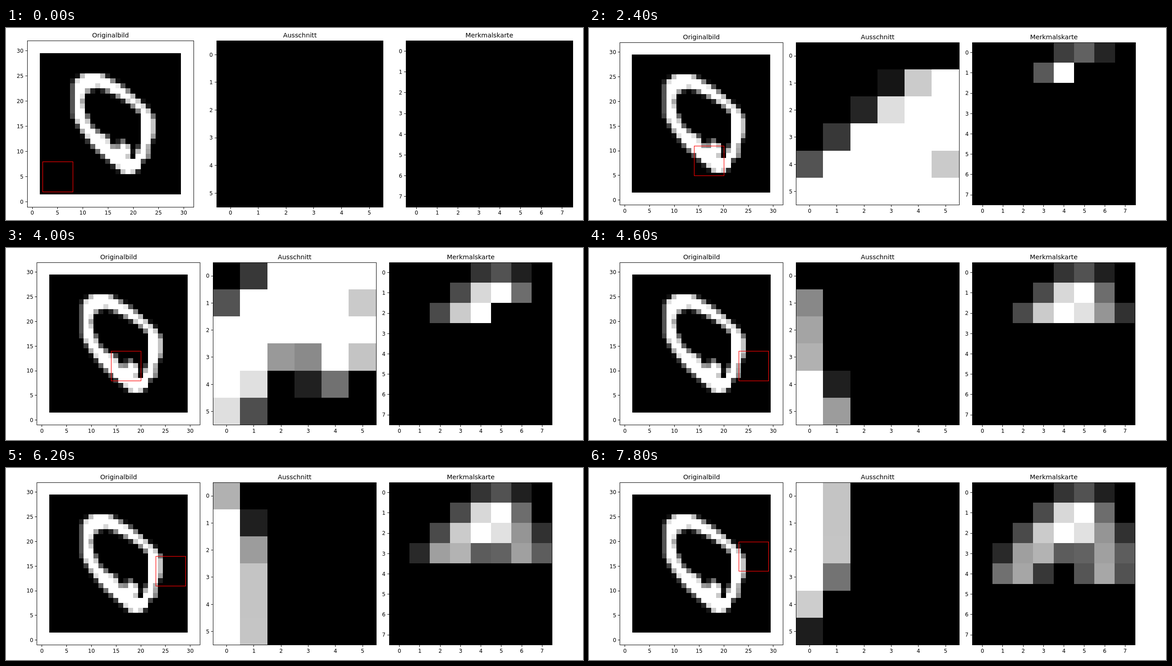
Animation, 1280 px wide and 427 px high, one loop 8 s. Source, as an HTML page with a canvas:

```html
<!DOCTYPE html>
<html lang="de">
<head>
<meta charset="utf-8">
<style>
  html, body { margin: 0; width: 100%; height: 100%; overflow: hidden; background: #fff; }
  canvas { display: block; }
</style>
</head>
<body>
<canvas id="stage" width="1280" height="427"></canvas>
<script>
const ctx = document.getElementById('stage').getContext('2d');
const STEP = 200, GRID = 8, STEPS = 5 * GRID, WINDOW = 6, STRIDE = 3, SIZE = 32;
const FONT = '"DejaVu Sans", sans-serif';

// The handwritten zero as an outer contour and a hole, in pixel units with y pointing up.
const OUTER = `M18.7 6 L13 11 L10.3 14.5 L8.67 17.6 V24.2 L10.8 26 H14 L18.3 23.5 L20.2 22
  L21.9 20.4 L23.5 19 L24.77 17 V13.8 L23.7 11.8 L23.6 9.3 L22 8.4 V7.3 L20.3 6 Z`;
const HOLE = `M13.3 23.2 L11.2 22.2 L10.6 20.7 L11 18.5 L12.1 15.7 L13.4 14.5 L15.7 13.2
  L16 12 L16.5 11.4 L17.6 11.3 L17.8 12.4 H18.6 L19.9 11.6 L20.2 10.5 L19.7 9.8 L19.9 9.1
  H20.9 L21.4 10.9 L22 11.8 V18 L20.5 19.5 L18.3 21.1 L15.5 22.4 Z`;

const makeGrid = (n, value) =>
  Array.from({ length: n }, (_, y) => Array.from({ length: n }, (_, x) => value(x, y)));

// Antialiasing on a tiny canvas turns the contours into grey pixels.
function rasterize(path) {
  const small = document.createElement('canvas');
  small.width = small.height = SIZE;
  const pen = small.getContext('2d', { willReadFrequently: true });
  pen.fill(new Path2D(path), 'evenodd');
  const { data } = pen.getImageData(0, 0, SIZE, SIZE);
  return makeGrid(SIZE, (x, y) => data[4 * (y * SIZE + x) + 3] / 255);
}

const digit = rasterize(OUTER + HOLE);

const crop = (col, row) =>
  makeGrid(WINDOW, (x, y) => digit[2 + STRIDE * row + y][2 + STRIDE * col + x]);

const features = makeGrid(GRID, (col, row) =>
  crop(col, row).flat().reduce((sum, v) => sum + v, 0));

// The layout settles step by step: the panels move towards each other.
function layout(step) {
  if (step === 0) return { middle: 652, pitch: 420.2, top: 28.4, side: 369.6 };
  if (step === 1) return { middle: 646.4, pitch: 416.2, top: 32, side: 361.7 };
  return { middle: 640.35, pitch: 390.65 + 21.6 * (2 / 3) ** (step - 2), top: 32, side: 361.7 };
}

function box(x0, y0, x1, y1, color) {
  const left = Math.floor(x0), top = Math.floor(y0);
  ctx.fillStyle = color;
  ctx.fillRect(left, top, Math.floor(x1) - left, Math.floor(y1) - top);
}

function outline(x0, y0, x1, y1, color, width) {
  const left = Math.floor(x0), top = Math.floor(y0);
  ctx.strokeStyle = color;
  ctx.lineWidth = width;
  ctx.strokeRect(left + 0.5, top + 0.5, Math.floor(x1) - left, Math.floor(y1) - top);
}

function label(text, x, y, align, size) {
  ctx.fillStyle = '#000';
  ctx.font = `${size}px ${FONT}`;
  ctx.textAlign = align;
  ctx.fillText(text, x, y);
}

function drawAxes(title, left, top, side, ticks, toX, toY) {
  const bottom = top + side;
  outline(left, top, left + side, bottom, '#000', 1);
  label(title, left + side / 2, top - 7.1, 'center', 14.22);
  for (const tick of ticks) {
    const x = toX(tick), y = toY(tick);
    ctx.fillRect(Math.floor(x), Math.floor(bottom) + 1, 1, 4);
    ctx.fillRect(Math.floor(left) - 4, Math.floor(y), 4, 1);
    label(tick, x, bottom + 17.4, 'center', 11.85);
    label(tick, left - 8.3, y + 4.3, 'right', 11.85);
  }
}

// Faint values sink to black and nearly full ones to white.
function tone(v) {
  const grey = v < 0.05 ? 0 : v > 0.925 ? 255 : Math.round(255 * v);
  return `rgb(${grey},${grey},${grey})`;
}

function drawCells(cells, max, toX, toY) {
  cells.forEach((row, y) => row.forEach((value, x) => {
    if (value <= 0) return;
    const ya = toY(y - 0.5), yb = toY(y + 0.5);
    box(toX(x - 0.5), Math.min(ya, yb), toX(x + 0.5), Math.max(ya, yb), tone(value / max));
  }));
}

function drawImagePanel(left, top, side, col, row) {
  const unit = side / 33;
  const toX = v => left + (v + 1) * unit;
  const toY = v => top + (32 - v) * unit;
  box(toX(1.5), toY(29.5), toX(29.5), toY(1.5), '#000');
  drawCells(digit, 1, toX, toY);
  const x = 2 + STRIDE * col, y = 2 + STRIDE * row;
  const edges = [toX(x), toY(y + WINDOW), toX(x + WINDOW), toY(y)].map(Math.round);
  outline(...edges, '#f00', 1.2);
  drawAxes('Originalbild', left, top, side, [0, 5, 10, 15, 20, 25, 30], toX, toY);
}

function drawMatrixPanel(title, left, top, side, cells) {
  const unit = side / cells.length;
  const toX = v => left + (v + 0.5) * unit;
  const toY = v => top + (v + 0.5) * unit;
  box(left, top, left + side, top + side, '#000');
  drawCells(cells, Math.max(...cells.flat()), toX, toY);
  drawAxes(title, left, top, side, cells.map((_, i) => i), toX, toY);
}

function draw(step) {
  const col = step % GRID, row = Math.floor(step / GRID);
  const { middle, pitch, top, side } = layout(step);
  const left = middle - side / 2;
  const known = makeGrid(GRID, (x, y) => y * GRID + x <= step ? features[y][x] : 0);
  ctx.fillStyle = '#fff';
  ctx.fillRect(0, 0, 1280, 427);
  drawImagePanel(left - pitch, top, side, col, row);
  drawMatrixPanel('Ausschnitt', left, top, side, crop(col, row));
  drawMatrixPanel('Merkmalskarte', left + pitch, top, side, known);
}

function frame() {
  draw(Math.floor(performance.now() / STEP) % STEPS);
  requestAnimationFrame(frame);
}
frame();
</script>
</body>
</html>
```
